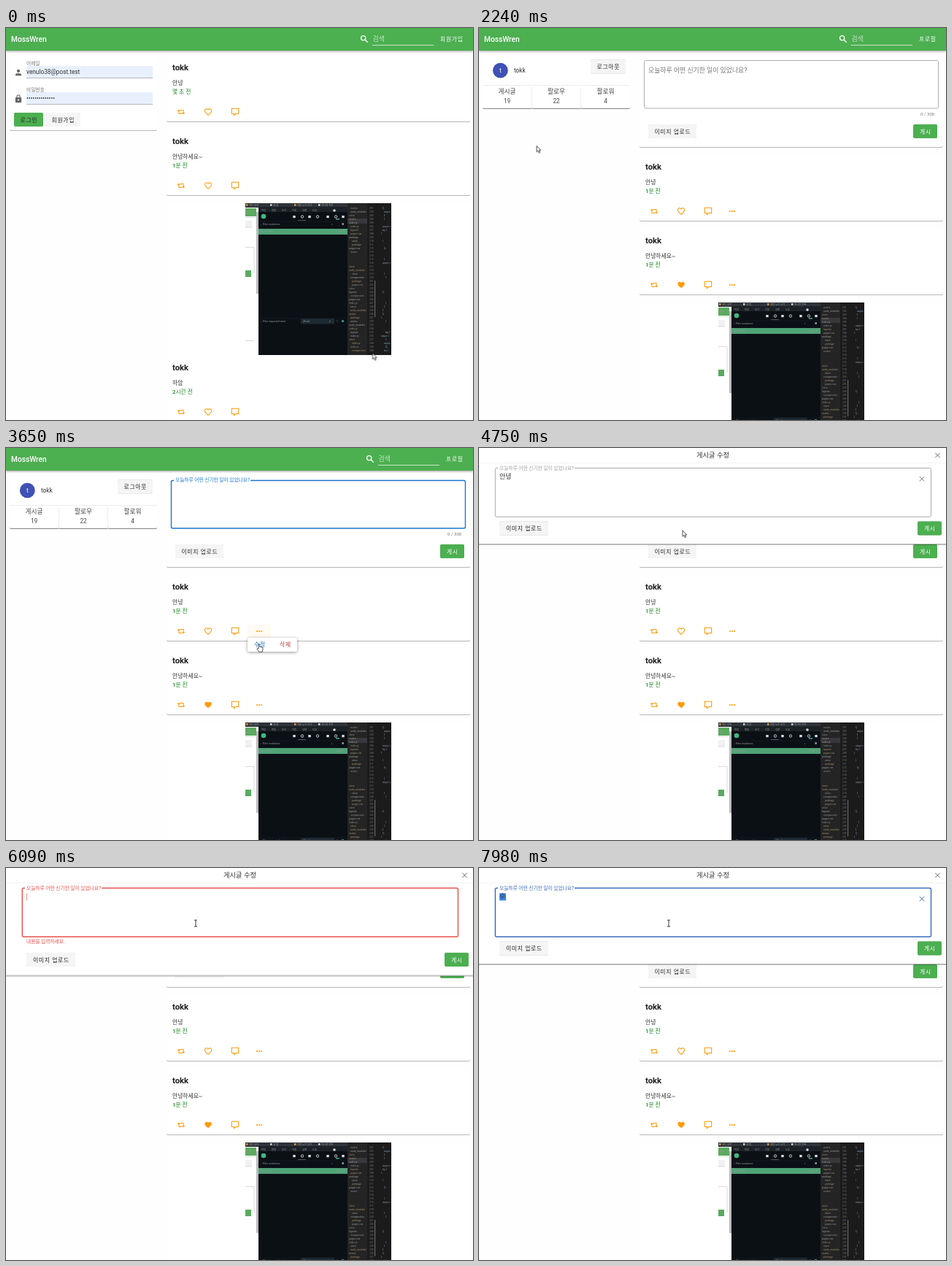
Animation of 640x537 px, one loop 8 s. Source, as an HTML page:

```html
<!DOCTYPE html>
<html lang="ko">
<head>
<meta charset="utf-8">
<title>MossWren</title>
<style>
html, body { margin: 0; width: 100%; height: 100%; overflow: hidden; background: #fefefe; }
svg { display: block; }
#stage { width: 640px; height: 537px; }
text { font: 7.8px Roboto, "Noto Sans CJK KR", "Noto Sans CJK", sans-serif; fill: #333; white-space: pre; }
.in { font-size: 8.9px; }
.latin { font-size: 8.25px; }
.lab { font-size: 6.7px; fill: #777; }
.btn { letter-spacing: .09em; fill: #222; }
.white { fill: #fff; }
.mid { text-anchor: middle; }
.stat { font-size: 8.7px; text-anchor: middle; fill: #444; }
.name { font-size: 11.3px; font-weight: 700; fill: #222; }
.brand { font-size: 10.2px; font-weight: 500; fill: #fff; }
.ago { fill: #1b8a24; font-weight: 500; }
.tiny { font-size: 3.4px; fill: #999; }
.card { fill: #fff; filter: drop-shadow(0 1px .5px rgba(0,0,0,.28)); }
.low { filter: drop-shadow(0 .8px .5px rgba(0,0,0,.28)); }
.menu { fill: #fff; filter: drop-shadow(0 1.5px 2px rgba(0,0,0,.4)); }
.bar { fill: #4caf50; filter: drop-shadow(0 1px 1.5px rgba(0,0,0,.4)); }
</style>
</head>
<body>
<svg id="stage" viewBox="0 0 640 537"></svg>
<script>
const LOOP = 8000, USER = 'tokk';
const css = [];

const anim = (stops, ease = 'linear') => {
  const id = 'k' + css.length;
  css.push(`@keyframes ${id}{${stops.map(([t, s]) => `${t / LOOP * 100}%{${s}}`).join('')}}`);
  return `animation:${id} ${LOOP}ms ${ease} infinite`;
};
// Visible only inside the given time ranges
const during = (body, ...ranges) => {
  const stops = [[0, 'opacity:0']];
  ranges.forEach(([a, b]) => stops.push([a, 'opacity:1'], [b, 'opacity:0']));
  return `<g style="${anim(stops, 'step-end')}">${body}</g>`;
};
const text = (x, y, s, cls = '', more = '') => `<text x="${x}" y="${y}" class="${cls}" ${more}>${s}</text>`;
const rect = (x, y, w, h, fill, more = '') =>
  `<rect x="${x}" y="${y}" width="${w}" height="${h}" ${fill ? `fill="${fill}"` : ''} ${more}/>`;
const line = (d, color, w = 1) => `<path d="${d}" fill="none" stroke="${color}" stroke-width="${w}"/>`;
const card = (x, y, w, h) => rect(x, y, w, h, '', 'rx="2" class="card"');
const button = (x, y, w, label, fill = '#f5f5f5', cls = '') =>
  rect(x, y, w, 19, fill, 'rx="2" class="low"') + text(x + w / 2 + .35, y + 12.5, label, 'btn mid ' + cls);
const cross = (x, y, color) => line(`M${x - 3.2} ${y - 3.2}l6.4 6.4m0-6.4l-6.4 6.4`, color, 1);

const glyphs = {
  repost: 'M6 5.75L10.25 10H7V16H13.5L15.5 18H7A2 2 0 0 1 5 16V10H1.75ZM18 18.25L13.75 14H17V8H10.5L8.5 6H17A2 2 0 0 1 19 8V14H22.25Z',
  heart: 'M12 20.2L10.6 19C5.4 14.3 2.9 12 2.9 8.6A4.6 4.6 0 0 1 7.5 4C9.3 4 11 4.9 12 6.2C13 4.9 14.7 4 16.5 4A4.6 4.6 0 0 1 21.1 8.6C21.1 12 18.6 14.3 13.4 19Z',
  note: 'M3 3H21V17H13.5L9 21V17H3Z',
  dots: 'M4 12a2 2 0 1 0 4 0a2 2 0 1 0-4 0m6 0a2 2 0 1 0 4 0a2 2 0 1 0-4 0m6 0a2 2 0 1 0 4 0a2 2 0 1 0-4 0',
  person: 'M12 4A4 4 0 0 1 12 12A4 4 0 0 1 12 4M12 14C16.4 14 20 15.8 20 18V20H4V18C4 15.8 7.6 14 12 14Z',
  lock: 'M12 17a2 2 0 0 0 0-4a2 2 0 0 0 0 4M18 8a2 2 0 0 1 2 2V20a2 2 0 0 1-2 2H6a2 2 0 0 1-2-2V10a2 2 0 0 1 2-2H7V6A5 5 0 0 1 17 6V8ZM12 3A3 3 0 0 0 9 6V8H15V6A3 3 0 0 0 12 3Z',
  search: 'M14.5 14.5L21 21M3.5 9.5a6 6 0 1 0 12 0a6 6 0 1 0-12 0'
};
const icon = (name, x, y, color = '#ff9800', stroke = 0) =>
  `<path d="${glyphs[name]}" transform="translate(${x} ${y}) scale(.52) translate(-12 -12)" fill-rule="evenodd" ` +
  (stroke ? `fill="none" stroke="${color}" stroke-width="${stroke}"/>` : `fill="${color}"/>`);

// Post parts, y is the top of the text block
const guest = [0, 1820], member = [1820, LOOP];
const post = (y, body, ago, liked) =>
  text(228, y + 20, USER, 'name') + text(228, y + 40.2, body) + ago(y + 51.5) +
  icon('repost', 240, y + 77) + icon('note', 314, y + 77, undefined, 2) +
  (liked ? during(icon('heart', 277, y + 77, undefined, 2), guest) + during(icon('heart', 277, y + 77), member)
         : icon('heart', 277, y + 77, undefined, 2)) +
  during(icon('dots', 347, y + 77), member);
const ago = s => y => text(228, y, s, 'ago');

// Screen capture inside the third post
const shot = () => {
  let seed = 7;
  const rnd = n => (seed = (seed * 16807) % 2147483647) % n;
  const pick = a => a[rnd(a.length)];
  let s = rect(0, 0, 200, 208, '#fff') +
    rect(0, 7, 15, 11, '#5aaa5f') + rect(0, 24, 9, 9, '#f1f1f1') + rect(0, 92, 8, 9, '#5aaa5f') +
    line('M0 19.5H14M0 33H9M0 60.5H12V96M0 188.5H12', '#ccc', .7) +
    text(1, 14, '검색', 'tiny') + rect(15, 12, 3, 112, '#bcbcbc') +
    rect(18, 8, 122, 200, '#0b1015') + rect(140, 0, 27, 208, '#242424') + rect(167, 0, 33, 208, '#1b1b1b') +
    rect(0, 0, 140, 6, '#30343a') + rect(18, 5, 122, 7, '#1d2227');
  ['메인 화면', '새 탭', '개발 노트 보기', '게시판 목록'].forEach((w, i) =>
    s += rect(1 + i * 33, 1.2, 2.5, 2.5, i % 2 ? '#d9d9d9' : '#e0a040') + text(5 + i * 33, 3.8, w, 'tiny white'));
  ['파일', '편집', '보기', '이동', '실행', '도움'].forEach((w, i) => s += text(22 + i * 14, 10.5, w, 'tiny'));
  s += '<circle cx="25" cy="18" r="3.3" fill="#42b883"/><circle cx="122" cy="10" r="1.8" fill="#ddd"/>';
  [67, 78, 88, 99, 113, 124, 134].forEach((x, i) =>
    s += i % 2 ? `<circle cx="${x}" cy="18.5" r="1.7" fill="none" stroke="#ddd" stroke-width=".9"/>`
               : rect(x - 1.7, 17, 3.4, 3.2, '#ddd'));
  s += rect(72, 23, 11, .7, '#6c7680') + rect(124, 21, 5, 1.6, '#3f9f86') + line('M18 25H140M18 158H140', '#182027', .6) +
    text(21, 30.4, '⌕ Filter mutations', 'tiny') + text(117, 30.4, '↓', 'tiny') + text(132, 30.4, '●', 'tiny') +
    rect(18, 35, 122, 8, '#4fa377') + text(21, 40.3, 'Base State', 'tiny white') + text(124, 40.3, '10:42:15', 'tiny white') +
    text(21, 163, '⌕ Filter inspected state', 'tiny') + rect(76, 158, 46, 7.5, '#1d2a33') +
    text(79, 163, '(Root)', 'tiny white') + text(115, 163, '▾', 'tiny') + text(124, 163, '□', 'tiny') +
    rect(132, 160, 3, 3, '#2e8f74') + rect(140, 21, 27, 7, '#37373d');
  const files = ['components', 'node_modules', 'layouts', 'pages.vue', 'store', 'index.js', 'package', 'routes'];
  const code = ['}', '});', 'async r', 'try {', '}', 'cons', '})'];
  for (let y = 8; y < 208; y += 5) {
    const open = y > 72 && y < 88;
    if (!open) s += text(142 + rnd(3) * 2, y, pick(files), 'tiny', `style="fill:${pick(['#8a8a8a', '#999', '#a08c68'])}"`);
    s += text(170, y, 200 + y / 5 | 0, 'tiny', 'style="fill:#777"');
    if (rnd(3)) s += text(186 + rnd(4) * 2, y, pick(code), 'tiny', `style="fill:${pick(['#a58fb8', '#bbb', '#7da7c0'])}"`);
  }
  s += rect(177, 106, 1.2, 50, '#666');
  return `<svg x="328" y="240" width="200" height="208">${s}</svg>`;
};

const feed = `<g style="${anim([[0, 'transform:none'], [1820, 'transform:translateY(136px)'], [LOOP, 'transform:none']], 'step-end')}">` +
  card(220, 38, 416, 90) + post(38, '안녕', y => during(text(228, y, '몇 초 전', 'ago'), guest) + during(text(228, y, '1분 전', 'ago'), member)) +
  card(220, 139, 416, 90) + post(139, '안녕하세요~', ago('1분 전'), true) +
  card(220, 240, 416, 310) + shot() + post(449, '하암', ago('2시간 전')) + '</g>';

const tools = (dx, label) => icon('search', 491 + dx, 15, '#fff', 2.6) + text(502.5 + dx, 18, '검색', 'in', 'style="fill:#c3e6c5"') +
  line(`M${502 + dx} 23.5h84`, '#d5edd6', .9) + text(595 + dx, 18, label, 'btn white');
const header = rect(0, 0, 640, 31, '', 'class="bar"') + text(7, 18.6, 'MossWren', 'brand') +
  during(tools(0, '회원가입'), guest) + during(tools(8, '프로필'), member);

const field = (y, name, label, value) => icon(name, 17, y + 9, '#666') + text(28, y - 1.2, label, 'lab') +
  rect(28, y, 173, 17, '#e8f0fe') + line(`M28 ${y + 16.5}h173`, '#a5a8ad', .8) + text(28, y + 11.2, value, 'latin');
const ripple = anim([[0, 'opacity:0;r:2px'], [869, 'opacity:0;r:2px'], [870, 'opacity:.2;r:3px'],
  [1150, 'opacity:.2;r:34px'], [1500, 'opacity:0;r:34px'], [LOOP, 'opacity:0;r:2px']]);
const login = card(5, 38, 202, 102) + field(52, 'person', '이메일', 'venulo38@post.test') +
  field(88, 'lock', '비밀번호', '•'.repeat(14)) + button(11, 116, 40, '로그인', '#4caf50') + button(54, 116, 48, '회원가입') +
  during(rect(11, 116, 40, 19, '#000', 'rx="2" opacity=".1"'), [400, 1820]) +
  `<svg x="11" y="116" width="40" height="19"><circle cx="14" cy="5" style="${ripple}"/></svg>`;

const profile = card(5, 38, 202, 72) + '<circle cx="29.3" cy="58.2" r="10.4" fill="#3f51b5"/>' +
  text(29.3, 61, USER[0], 'latin white mid') + text(48, 61.3, USER, 'latin') + button(153, 43.5, 48, '로그아웃') +
  [['게시글', 19], ['팔로우', 22], ['팔로워', 4]].map(([k, n], i) =>
    card(5 + i * 67.5, 79, 67, 31) + line(`M${5 + i * 67.5} 78.7h67`, '#e2e2e2', .7) +
    text(38.5 + i * 67.5, 90.3, k, 'stat') + text(38.5 + i * 67.5, 102.6, n, 'stat', 'style="font-size:8.2px"')).join('');

const hint = '오늘하루 어떤 신기한 일이 있었나요?';
const rest = 'transform:translate(232px,60.7px);fill:#777', lifted = 'transform:translate(232px,46.4px) scale(.753);fill:#1976d2';
const compose = card(220, 38, 416, 125) +
  during(rect(226.5, 44.5, 403, 65.5, 'none', 'rx="2" stroke="#a6a6a6" stroke-width=".9"'), [0, 2800]) +
  during(rect(226.5, 44.5, 403, 65.5, 'none', 'rx="2" stroke="#1976d2" stroke-width="1.4"') + rect(230, 42, 105, 5, '#fff'), [2800, LOOP]) +
  `<text class="in" style="${anim([[0, rest], [2780, rest], [2930, lifted], [LOOP, lifted]])}">${hint}</text>` +
  text(605, 120, '0 / 300', '', 'style="font-size:6.1px;fill:#777"') +
  button(232, 132, 66, '이미지 업로드') + button(595, 132, 33, '게시', '#4caf50', 'white');

const hid = 'opacity:0;transform:translate(331px,260px) scale(.6)', open = 'opacity:1;transform:translate(331px,260px)';
const menu = during(rect(331, 242, 32, 18, '#ff9800', 'rx="2" opacity=".05"'), [3150, 4130]) +
  `<g style="${anim([[0, hid], [3280, hid], [3420, open], [3760, open], [3900, hid], [LOOP, hid]])}">` +
  rect(0, 0, 68, 19, '', 'rx="2" class="menu"') + text(9, 12.3, '수정', 'btn', 'style="fill:#1976d2"') +
  text(44, 12.3, '삭제', 'btn', 'style="fill:#b5443c"') + '</g>';

// Edit dialog
const up = 'transform:translateY(-140px)', down = 'transform:none', low = 'transform:translateY(15.6px)';
const tone = (c, w) => `color:${c};stroke-width:${w}`;
const grey = tone('#a0a0a0', .9), blue = tone('#3a6cb8', 1.4), red = tone('#e8504c', 1.4);
const typed = [
  ['안녕', 0, 5700], ['안', 5700, 5850], ['t', 6250, 6330], ['tn', 6330, 6400], ['tnw', 6400, 6480],
  ['tnwjd', 6480, 6640], ['tnwjdg', 6640, 6790], ['tnwjdgk', 6790, 6950], ['tnwjdg', 6950, 7500]
];
const caret = (x, a, b) => during(line(`M${x} 34.5v10`, 'currentColor', .7), [a, b]);
const footMove = anim([[0, down], [5880, down], [6000, low], [6250, low], [6400, down],
  [7540, down], [7650, low], [7820, low], [7950, down], [LOOP, down]]);
const dialog = `<g style="${anim([[0, up], [3850, up], [4130, down], [LOOP - 1, down], [LOOP, up]], 'ease-out')}">` +
  `<g style="${footMove}">` + rect(0, 40, 640, 92, '', 'class="card"') + line('M0 131.5H640', '#aaa', .8) +
  button(28, 100.5, 67, '이미지 업로드') + button(601, 100.5, 33, '게시', '#4caf50', 'white') + '</g>' +
  rect(0, 0, 640, 96, '#fff') + line('M0 20.5H640', '#efefef', .8) +
  text(320.5, 12.8, '게시글 수정', 'mid', 'style="font-size:9.3px"') + cross(628.5, 10, '#666') +
  `<g style="${anim([[0, grey], [5160, blue], [5880, red], [6250, blue], [7540, red], [7850, blue], [LOOP, blue]], 'step-end')}">` +
  '<rect x="22.3" y="27.5" width="597.2" height="66.8" rx="2" fill="none" stroke="currentColor"/>' +
  rect(26, 25.5, 105, 5, '#fff') + text(28, 30, hint, 'lab', 'style="fill:currentColor;stroke:none"') +
  during(text(28, 103, '내용을 입력하세요.', 'lab', 'style="fill:currentColor"'), [5930, 6250], [7590, 7850]) +
  during(cross(607, 42.3, '#777'), [0, 5160]) +
  during(cross(607, 42.3, 'currentColor'), [5160, 5850], [6250, 7500], [7820, LOOP]) +
  caret(44.6, 5160, 5540) + caret(36.5, 5700, 5850) + caret(28.6, 5850, 6250) + caret(48.6, 6480, 6640) +
  caret(53, 6640, 6790) + caret(57.2, 6790, 6950) + caret(53, 6950, 7340) + caret(28.6, 7500, 7820) + '</g>' +
  typed.map(([s, a, b]) => during(text(28, 42.2, s, s < 'z' ? 'latin' : 'in'), [a, b])).join('') +
  during(rect(28, 34.5, 9, 10, '#3a86e0'), [7820, LOOP]) +
  during(text(28, 42.2, 'ㅅ', 'in'), [7820, 7900]) + during(text(28, 42.2, '수', 'in'), [7900, LOOP]) + '</g>';

// Pointer, drawn around its hot spot
const ink = 'fill="#fff" stroke="#222" stroke-width=".8" stroke-linejoin="round"';
const arrow = `<path d="M0 0V8.2L1.9 6.5L3.2 9.6L4.6 9L3.3 6H5.8Z" ${ink}/>`;
const hand = `<path d="M-.8 .8Q0-.6 .9 .8V4.2L4.3 5Q5.3 5.4 5.2 6.5L4.3 11.4H.1L-2.8 7.4Q-2.9 5.9-.8 7Z" ${ink}/>`;
const beam = line('M-2-4.3H2M0-4.3V4.3M-2 4.3H2', '#222', .9);
const path = [
  [0, 502.5, 445.5], [70, 502.5, 445.5], [470, 25, 119.5], [1900, 25, 119.5], [2240, 79, 161.5], [2550, 229, 140],
  [2780, 300, 82], [2880, 300, 82], [3180, 346, 249], [3420, 346, 249], [3560, 346.8, 268], [4500, 346.8, 268],
  [4750, 279, 113], [5050, 260, 75.7], [LOOP, 260, 75.7]
];
const pointer = `<g style="${anim(path.map(([t, x, y]) => [t, `transform:translate(${x}px,${y}px)`]), 'ease-in-out')}">` +
  during(arrow, [0, 430], [1820, 2620], [2980, 3130], [4130, 4860]) + during(hand, [430, 1820], [3130, 4130]) +
  during(beam, [2620, 2980], [4860, LOOP]) + '</g>';

const scene = rect(0, 0, 640, 537, '#fefefe') + feed + during(login, guest) + during(profile + compose, member) +
  header + menu + dialog + pointer;
document.head.appendChild(document.createElement('style')).textContent = css.join('\n');
document.getElementById('stage').innerHTML = scene;
</script>
</body>
</html>
```
